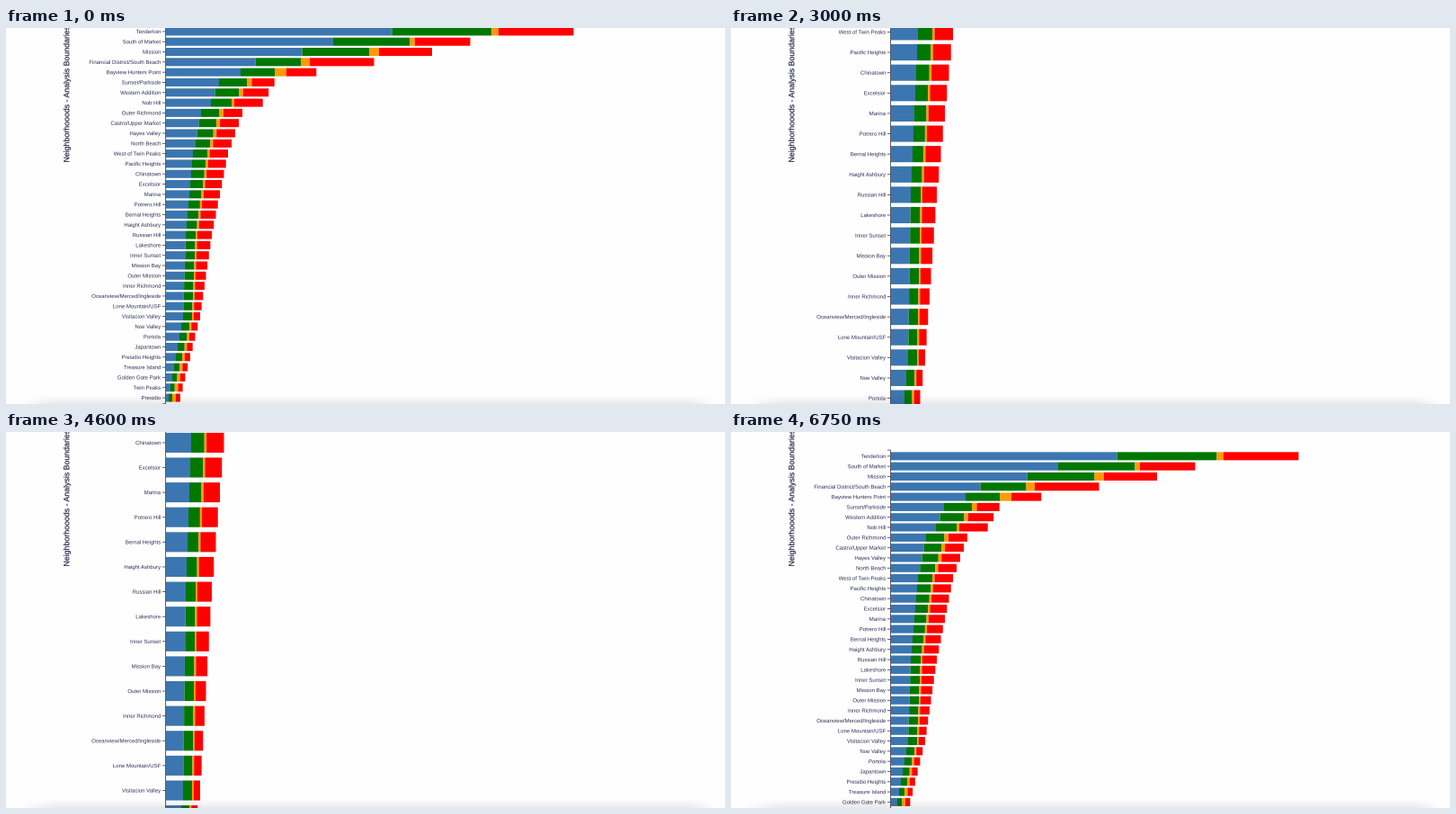
A matplotlib script for the animation above (6800 ms loop, 800 px wide and 418 px high).

```python
import numpy as np
import matplotlib.pyplot as plt
from matplotlib.animation import FuncAnimation
from matplotlib.patches import PathPatch, Rectangle
from matplotlib.textpath import TextPath
from matplotlib.transforms import Affine2D

W, H, DPI = 800, 418, 100
INTERVAL, LOOP = 50, 6800
PX = 72 / DPI                       # points per pixel
AXIS_X, LABEL_X = 178, 172
TOP, STEP, MAX_ZOOM = 3.9, 11.31, 4
IN_Y, OUT_Y = 274.8, 305.4          # pointer height while zooming in / out
ZOOM_IN, ZOOM_OUT = (2200, 3800), (4036, 5436)

NAMES = """Tenderloin, South of Market, Mission, Financial District/South Beach,
Bayview Hunters Point, Sunset/Parkside, Western Addition, Nob Hill, Outer Richmond,
Castro/Upper Market, Hayes Valley, North Beach, West of Twin Peaks, Pacific Heights,
Chinatown, Excelsior, Marina, Potrero Hill, Bernal Heights, Haight Ashbury,
Russian Hill, Lakeshore, Inner Sunset, Mission Bay, Outer Mission, Inner Richmond,
Oceanview/Merced/Ingleside, Lone Mountain/USF, Visitacion Valley, Noe Valley,
Portola, Japantown, Presidio Heights, Treasure Island, Golden Gate Park,
Twin Peaks, Presidio""".replace("\n", " ").split(", ")

# right edges of the stacked segments at a few rows, interpolated between them
COLORS = "#3c76b0", "#007800", "#ff9a00", "#ff0000"
KEY_EDGES = {
    0: (429.5, 540.5, 548, 631.5),
    1: (364, 449.5, 455, 516.5),
    2: (329.5, 404.5, 415, 474),
    3: (277.5, 328.5, 338, 409.5),
    4: (261, 299.5, 312, 345.3),
    5: (237, 268, 273.5, 298.7),
    7: (228, 251, 254, 285.7),
    8: (217, 237.5, 242, 263),
    12: (208, 224, 226.5, 247),
    20: (200, 211, 213, 229),
    28: (197, 207, 208.7, 216),
    36: (181, 185, 189, 193.8),
}

fig = plt.figure(figsize=(W / DPI, H / DPI), dpi=DPI, facecolor="#fefefe")
ax = fig.add_axes([0, 0, 1, 1])
ax.axis("off")

zoom = Affine2D()                   # row units to pixels
rows = zoom + ax.transData


def text_path(text, size):
    return TextPath((0, 0), text, size=size, prop={"family": "Liberation Sans"})


def add_text(path, place, color, edge=0):
    ax.add_artist(PathPatch(path, fc=color, ec=color, lw=edge * PX,
                            transform=place + ax.transData))


def add_line(x, y, width):
    ax.add_artist(plt.Line2D(x, y, color="#444450", lw=width * PX, transform=rows,
                             solid_capstyle="butt", snap=False))


index = np.arange(len(NAMES))
left = np.full(len(NAMES), AXIS_X)
for color, edges in zip(COLORS, zip(*KEY_EDGES.values())):
    right = np.interp(index, list(KEY_EDGES), edges)
    for i, a, b in zip(index, left, right):
        ax.add_artist(Rectangle((a, i - .4), b - a, .8, fc=color, lw=0,
                                transform=rows, snap=False))
    left = right

ends = (-.6, len(NAMES) - .4)
add_line([177.6, 177.6], ends, .9)
for y in (*index, *ends):
    add_line([174, 177.6], [y, y], .8)

labels = []
for name in NAMES:
    path, place = text_path(name, 6), Affine2D()
    labels.append((LABEL_X - path.get_extents().x1, place))
    add_text(path, place, "#2e2e54")

title = text_path("Neighborhooods - Analysis Boundaries", 8.8)
add_text(title, Affine2D([[0, -1, 70.3], [-1, 0, 149.5], [0, 0, 1]]), "#1c1c40", .15)

# soft shadow along the bottom edge
xs, ys = np.arange(W) + .5, np.arange(406, H) + .5
shade = np.zeros((len(ys), W, 4))
side_fade = np.clip((xs - 15) / 40, 0, 1) * np.clip((790 - xs) / 30, 0, 1)
shade[..., 3] = .09 * np.outer(((ys - 406) / 12) ** 1.5, side_fade)
ax.imshow(shade, extent=(0, W, H, 406), aspect="auto", zorder=5)
ax.set(xlim=(0, W), ylim=(H, 0))


def ease(ms, start, end):
    u = np.clip((ms - start) / (end - start), 0, 1)
    return u * u * (3 - 2 * u)


def scale_about(y, pivot, factor):
    return pivot + factor * (y - pivot)


def view(ms):
    """Height of the first row and distance between rows."""
    grow = MAX_ZOOM ** ease(ms, *ZOOM_IN)
    shrink = MAX_ZOOM ** -ease(ms, *ZOOM_OUT)
    top = scale_about(scale_about(TOP, IN_Y, grow), OUT_Y, shrink)
    return top, STEP * grow * shrink


def draw(frame):
    top, step = view(frame * INTERVAL)
    zoom.clear().scale(1, step).translate(0, top)
    for i, (x, place) in enumerate(labels):
        place.clear().scale(1, -1).translate(x, top + i * step + 2.1)
    return []


anim = FuncAnimation(fig, draw, frames=LOOP // INTERVAL, interval=INTERVAL,
                     repeat=True, repeat_delay=0)
plt.show()
```
